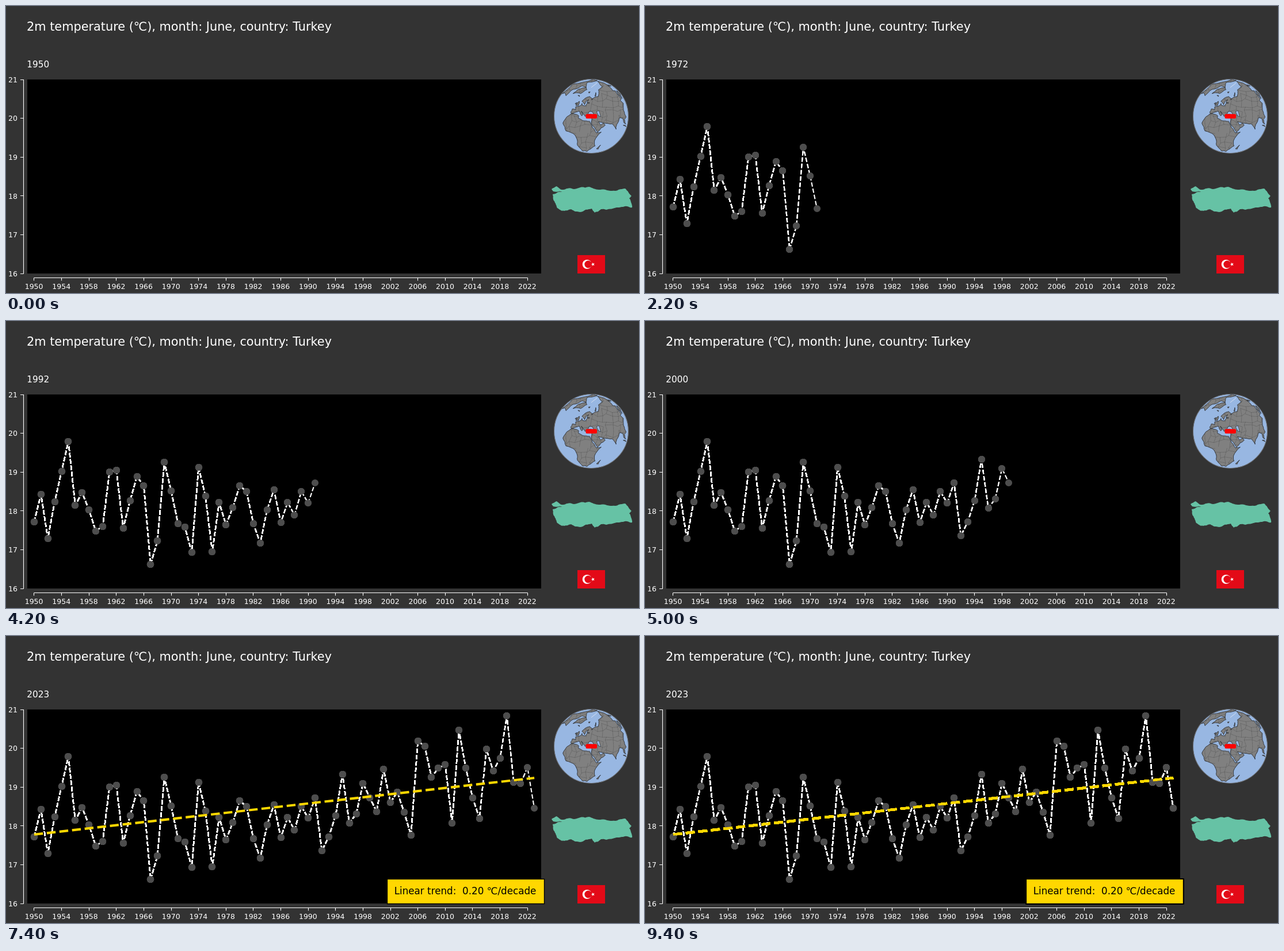
Animation, 1100 px wide and 500 px high, one loop 9500 ms. Source, as an HTML page:

```html
<!DOCTYPE html>
<html lang="en">
<head>
<meta charset="utf-8">
<title>June temperature</title>
<style>
html, body { margin: 0; width: 100%; height: 100%; overflow: hidden; background: #333; }
svg { display: block; width: 1100px; height: 500px; font-family: "DejaVu Sans", sans-serif; }
text { white-space: pre; }
</style>
</head>
<body>
<svg id="stage" viewBox="0 0 1100 500">
  <rect width="1100" height="500" fill="#333"/>
  <rect x="37" y="128" width="893" height="338"/>
  <g fill="#fff">
    <text x="36" y="43" font-size="20.83">2m temperature (℃), month: June, country: Turkey</text>
    <text id="year" x="36.3" y="107" font-size="15.28">1950</text>
  </g>
  <g id="axes" fill="#fff" font-size="12.5"></g>
  <g id="globe"></g>
  <path id="country" fill="#66c2a5"/>
  <rect x="993" y="434" width="48" height="32" fill="#e30a17"/>
  <circle cx="1009.7" cy="450" r="8" fill="#fff"/>
  <circle cx="1011.7" cy="450" r="6.4" fill="#e30a17"/>
  <path id="star" fill="#fff"/>
  <g id="plots"></g>
</svg>
<script>
const $ = id => document.getElementById(id);
const STEP = 100, LOOP = 9500, LAST = 94, DEPTH = 24;
const GLOBE = { x: 1017, y: 192, r: 64.5, lon: 35, lat: 39 };

// June means as heights on the stage, 1950 to 2023
const heights = [
  350, 302, 379, 315, 262, 210, 321, 299, 329, 366, 358, 263, 260, 361, 313,
  271, 287, 424, 383, 246, 296, 353, 359, 403, 255, 305, 402, 316, 355, 325,
  287, 297, 353, 387, 329, 294, 351, 316, 338, 297, 317, 282, 374, 350, 313,
  241, 326, 310, 257, 282, 306, 232, 290, 272, 307, 347, 183, 192, 246, 230,
  224, 326, 164, 230, 282, 318, 197, 235, 213, 139, 255, 257, 229, 300];
const yearX = i => 48.9 + i * 893 / 75;

let seed = 7;
const noise = () => (seed = seed * 16807 % 2147483647) / 2147483647 - .5;
const parse = text => text.trim().split(/\s+/).map(p => p.split(',').map(Number));
const toPath = pts => 'M' + pts.map(p => p.map(v => v.toFixed(1)).join(' ')).join('L');

// Splits each edge of a closed outline and shifts the new points sideways
function roughen(pts, amount, rounds) {
  if (!rounds) return toPath(pts) + 'Z';
  const out = pts.flatMap(([x, y], i) => {
    const [u, v] = pts[(i + 1) % pts.length], k = amount * noise();
    return [[x, y], [(x + u) / 2 + (v - y) * k, (y + v) / 2 - (u - x) * k]];
  });
  return roughen(out, amount, rounds - 1);
}

function drawAxes() {
  let lines = 'M30.5 128V466.5M48.9 473.5H906.3', labels = '';
  for (let i = 0; i <= 5; i++) {
    const y = 128 + i * 67.6;
    lines += `M25 ${Math.floor(y) + .5}H30.5`;
    labels += `<text x="20" y="${y + 4.8}" text-anchor="end">${21 - i}</text>`;
  }
  for (let i = 0; i <= 72; i += 4) {
    lines += `M${Math.floor(yearX(i)) + .5} 473.5V478.5`;
    labels += `<text x="${yearX(i) - .3}" y="493.4" text-anchor="middle">${1950 + i}</text>`;
  }
  $('axes').innerHTML = `<path d="${lines}" fill="none" stroke="#fff" stroke-width="1.1"/>${labels}`;
}

// Orthographic view; hidden points slide to the limb
function project([lon, lat]) {
  const rad = Math.PI / 180, { sin, cos } = Math;
  const d = (lon - GLOBE.lon) * rad, p = lat * rad, p0 = GLOBE.lat * rad;
  const x = cos(p) * sin(d), y = cos(p0) * sin(p) - sin(p0) * cos(p) * cos(d);
  const depth = sin(p0) * sin(p) + cos(p0) * cos(p) * cos(d);
  const r = GLOBE.r / (depth < 0 ? Math.hypot(x, y) : 1);
  return [GLOBE.x + r * x, GLOBE.y - r * y];
}
const coast = text => roughen(parse(text).map(project), .16, 2);

// Key points of each coast as longitude,latitude
const eurasia = `-9,37 -9,43 -1,44 -4,48 8,54 8,57 11,54 20,54.5 23,59 30,60 22,60 25,65.5 17,61
  16,56 11,59 5,60 14,68 28,71 41,67 35,65 44,68 68,69 80,73 104,78 140,72 180,69 -170,66
  163,60 157,51 155,59 135,54 140,48 127,36 119,38 121,30 108,21 108,11 101,12 103,2 98,8
  98,16 91,22 80,15 77.5,8 72,20 57,26 48,30 51,24 56,26 59,22 45,13 35,28 36,36.5 27,37
  27,41 33,42 41,41 37,46 31,46.5 28,42 23,38 19.5,41 13,45 18,40 16,38 9,44 0,40 -5,36`;
const africa = `-6,36 10,37 11,33 20,31 32,31 37,21 43,12 51,12 40,-3 41,-15 35,-22 27,-34
  18,-34 12,-17 13,-8 9,4 -8,4.5 -17,14 -13,27`;
const america = `-80,28 -66,44 -53,47 -64,60 -62,66 -80,74 -62,82 -120,74 -156,71 -167,64
  -150,50 -100,45`;
const islands = [
  '-44,60 -40,65 -22,70 -20,82 -60,82 -55,70',
  '-5,50 1,52 -3,58.5 -5,55', '-10,52 -6,52 -7,55', '-23,65 -14,65 -17,66.5',
  '53,71 57,71 68,77', '12,79 20,77 25,80', '44,-24 47,-25 50,-14',
  '131,33 140,36 144,44', '95,5 105,-5 102,0'];
const caspian = '47,46 53,46 54,37 50,38';

// A jittered mesh stands for the borders
function borderMesh(size) {
  const node = {}, key = (i, j) => i + ',' + j;
  const n = Math.ceil(GLOBE.r / size);
  let d = '';
  for (let i = -n; i <= n; i++) for (let j = -n; j <= n; j++) {
    const at = [GLOBE.x + (i + noise() * .8) * size, GLOBE.y + (j + noise() * .8) * size];
    node[key(i, j)] = at;
    for (const near of [node[key(i - 1, j)], node[key(i, j - 1)]])
      if (near && noise() < .3) d += toPath([near, at]);
  }
  return d;
}

function drawGlobe() {
  const land = [eurasia, africa, america, ...islands].map(coast).join('');
  const disc = `cx="${GLOBE.x}" cy="${GLOBE.y}" r="${GLOBE.r}"`;
  $('globe').innerHTML = `
    <clipPath id="disc"><circle ${disc}/></clipPath>
    <clipPath id="land"><path d="${land}"/></clipPath>
    <circle ${disc} fill="#98b7e2"/>
    <g clip-path="url(#disc)" stroke-linejoin="round">
      <path d="${land}" fill="#808080" stroke="#111" stroke-width=".7"/>
      <path d="${borderMesh(9)}" clip-path="url(#land)" fill="none" stroke="#555" stroke-width=".6" stroke-dasharray="2 .6"/>
      <path d="${coast(caspian)}" fill="#98b7e2" stroke="#222" stroke-width=".6"/>
      <path d="M1017 142L1027 134" stroke="#e4eaf2" stroke-width=".8"/>
    </g>
    <circle ${disc} fill="none" stroke="#6c7076" stroke-width="1.1"/>
    <rect x="1007.5" y="188.3" width="19.5" height="7.6" rx="2" fill="red"/>`;
}

function drawCountry() {
  const outline = `948,319 957,314 966,320 987,319 1013,315 1030,320 1053,322 1076,318 1087,331
    1083,335 1088,351 1070,350 1034,354 1023,360 1018,353 998,359 982,354 970,357 958,352
    951,337 950,328 973,324 951,323`;
  $('country').setAttribute('d', roughen(parse(outline), .2, 3));
}

function drawStar() {
  const pts = Array.from({ length: 10 }, (_, i) => {
    const a = Math.PI * (1 + i / 5), r = i % 2 ? 1.3 : 3.5;
    return [1020 + r * Math.cos(a), 450 + r * Math.sin(a)];
  });
  $('star').setAttribute('d', toPath(pts) + 'Z');
}

const dashed = (d, color, w) => `<path d="${d}" fill="none" stroke="${color}" stroke-width="${w}"
  stroke-dasharray="${3.7 * w} ${1.6 * w}" stroke-linejoin="round"/>`;

const PT = 100 / 72;
const trend = dashed('M48.9 345.8L918.1 247.2', '#ffd700', 3 * PT) + `
  <rect x="662.5" y="423.5" width="273" height="43" fill="#ffd700" stroke="#000" stroke-width="${PT}"/>
  <text x="674.7" y="449.7" font-size="16.75">Linear trend:  0.20 ℃/decade</text>`;

// Every step paints the series again over the earlier ones, so edges harden with age
function drawPlots() {
  let out = '';
  for (let k = 1; k <= LAST; k++) {
    const pts = heights.slice(0, k);
    const line = 'M' + pts.map((y, i) => yearX(i).toFixed(2) + ' ' + y).join('L');
    const dots = pts.map((y, i) => `M${Math.round(yearX(i))} ${y}h.01`).join('');
    out += `<g display="none">${dashed(line, '#fff', 1.5 * PT)}
      <path d="${dots}" fill="none" stroke="#4d4d4d" stroke-width="12.2" stroke-linecap="round"/>
      ${k >= heights.length ? trend : ''}</g>`;
  }
  $('plots').innerHTML = out;
}

drawAxes();
drawGlobe();
drawCountry();
drawStar();
drawPlots();

const layers = [...$('plots').children];
const start = performance.now();
let shown = -1;

function render(ms) {
  const n = Math.floor((ms % LOOP) / STEP);
  if (n === shown) return;
  shown = n;
  $('year').textContent = Math.min(1950 + n, 2023);
  layers.forEach((g, i) => g.setAttribute('display', i < n && i >= n - DEPTH ? 'inline' : 'none'));
}

function tick() {
  render(performance.now() - start);
  requestAnimationFrame(tick);
}
tick();
</script>
</body>
</html>
```
